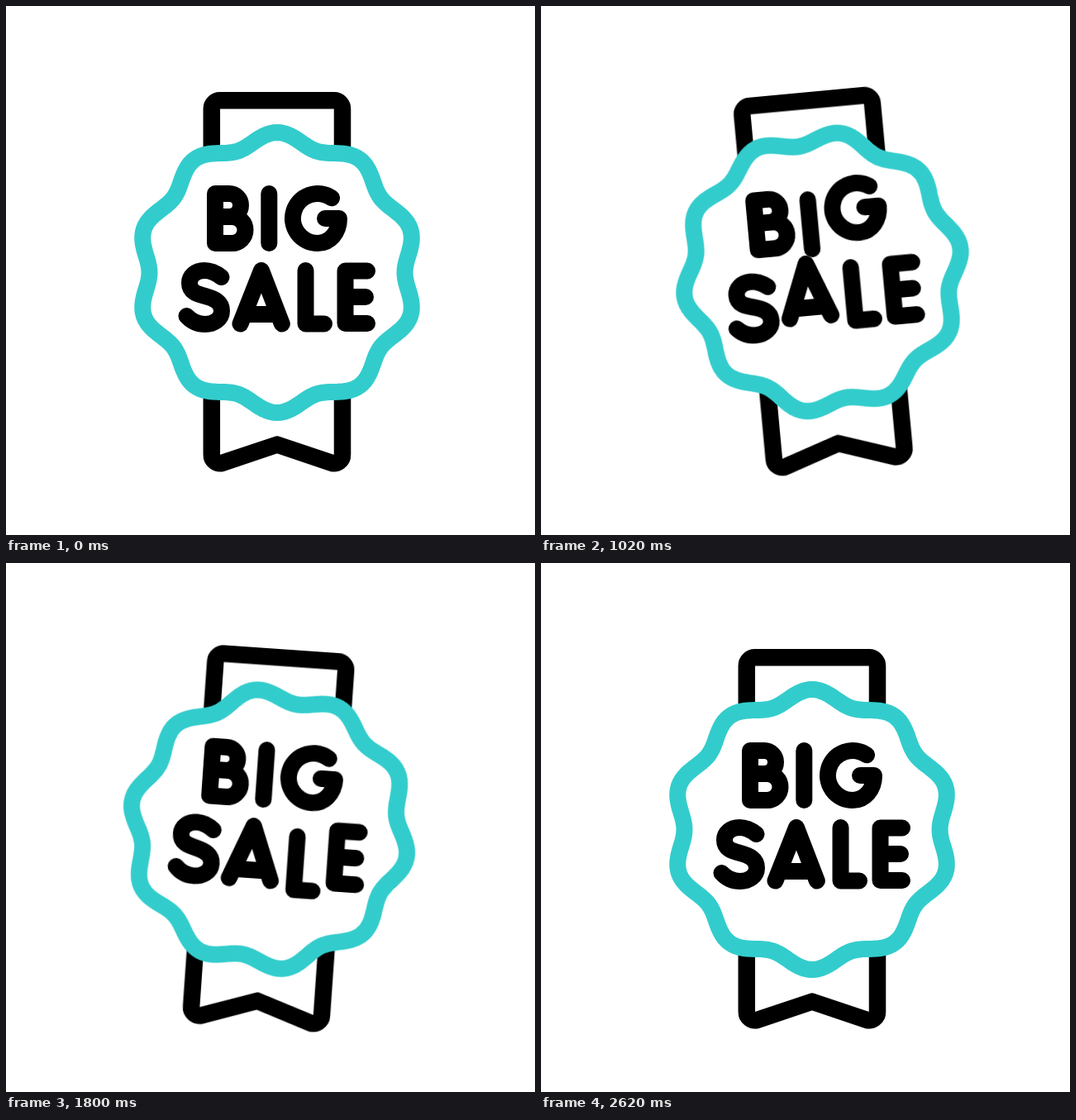
Animation, 640 px wide and 640 px high, one loop 2.8 s. Source, as an HTML page:

```html
<!DOCTYPE html>
<html lang="en">
<head>
<meta charset="utf-8">
<title>Big sale</title>
<style>
  html, body { margin: 0; width: 100%; height: 100%; overflow: hidden; background: #fff; }
  svg { display: block; width: 100%; height: 100%; }
  path { fill: none; stroke: #000; stroke-width: 20; stroke-linecap: round; stroke-linejoin: round; }

  .swing, .badge, .letters path {
    animation: 2800ms cubic-bezier(.3333, 0, .6667, 1) infinite;
  }
  .swing { transform-origin: 328px 187px; animation-name: swing; }
  .ribbon { stroke-width: 20.5; }
  .badge { fill: #fff; stroke: #33cccc; transform-origin: 328px 322.5px; animation-name: spin; }
  .letters path { animation-name: bob; animation-delay: var(--at); }

  @keyframes swing {
    0%, 7.143% { transform: rotate(0deg); }
    35.714% { transform: rotate(-5.3deg); }
    64.286% { transform: rotate(4deg); }
    92.5%, 100% { transform: rotate(0deg); }
  }
  @keyframes spin {
    0%, 7.32% { transform: rotate(0deg); }
    92.5%, 100% { transform: rotate(180deg); }
  }
  @keyframes bob {
    0% { transform: translateY(0); }
    10.714% { transform: translateY(-10px); }
    21.429% { transform: translateY(10px); }
    32.143%, 100% { transform: translateY(0); }
  }
</style>
</head>
<body>
<svg viewBox="0 0 640 640" role="img" aria-label="BIG SALE">
  <g class="swing">
    <path class="ribbon" d="M258.8 114.3H397a10 10 0 0 1 10 10V543a10 10 0 0 1-13.2 9.7L328 530.6 262 552.7A10 10 0 0 1 248.8 543V124.3a10 10 0 0 1 10-10Z"/>
    <path class="badge"/>
    <g class="letters">
      <!-- B I G -->
      <path style="--at:200ms" d="M253 227H270a14 14 0 0 1 0 28H253M270 255h3.5a16 16 0 0 1 0 32H253V227"/>
      <path style="--at:500ms" d="M318.3 227V287"/>
      <path style="--at:805ms" d="M394 232.3A30 30 0 1 0 377 287C392 287 403 274 403 257H386"/>
      <!-- S A L E -->
      <path style="--at:505ms" d="M260.5 328C253 322 246 320 240 320C229 320 222 327 222 335C222 346 231 348.5 241 351C252 354 261 358 261 369C261 379 251 385 241 385C231 385 224 381 218.5 375"/>
      <path style="--at:770ms" d="M283.5 384.5L309 320L333.8 384.5M290 373H327"/>
      <path style="--at:1140ms" d="M362.5 320V384.5H385"/>
      <path style="--at:1370ms" d="M437 320.5H410.5V384H437M410.5 352H435"/>
    </g>
  </g>
</svg>
<script>
  // Ten-lobed wavy ring around the badge centre.
  const points = Array.from({ length: 240 }, (_, i) => {
    const a = i / 240 * 2 * Math.PI;
    const r = 162 + 7.5 * Math.cos(10 * a);
    return `${(328 + r * Math.sin(a)).toFixed(2)} ${(322.5 - r * Math.cos(a)).toFixed(2)}`;
  });
  document.querySelector('.badge').setAttribute('d', `M${points.join('L')}Z`);
</script>
</body>
</html>
```
